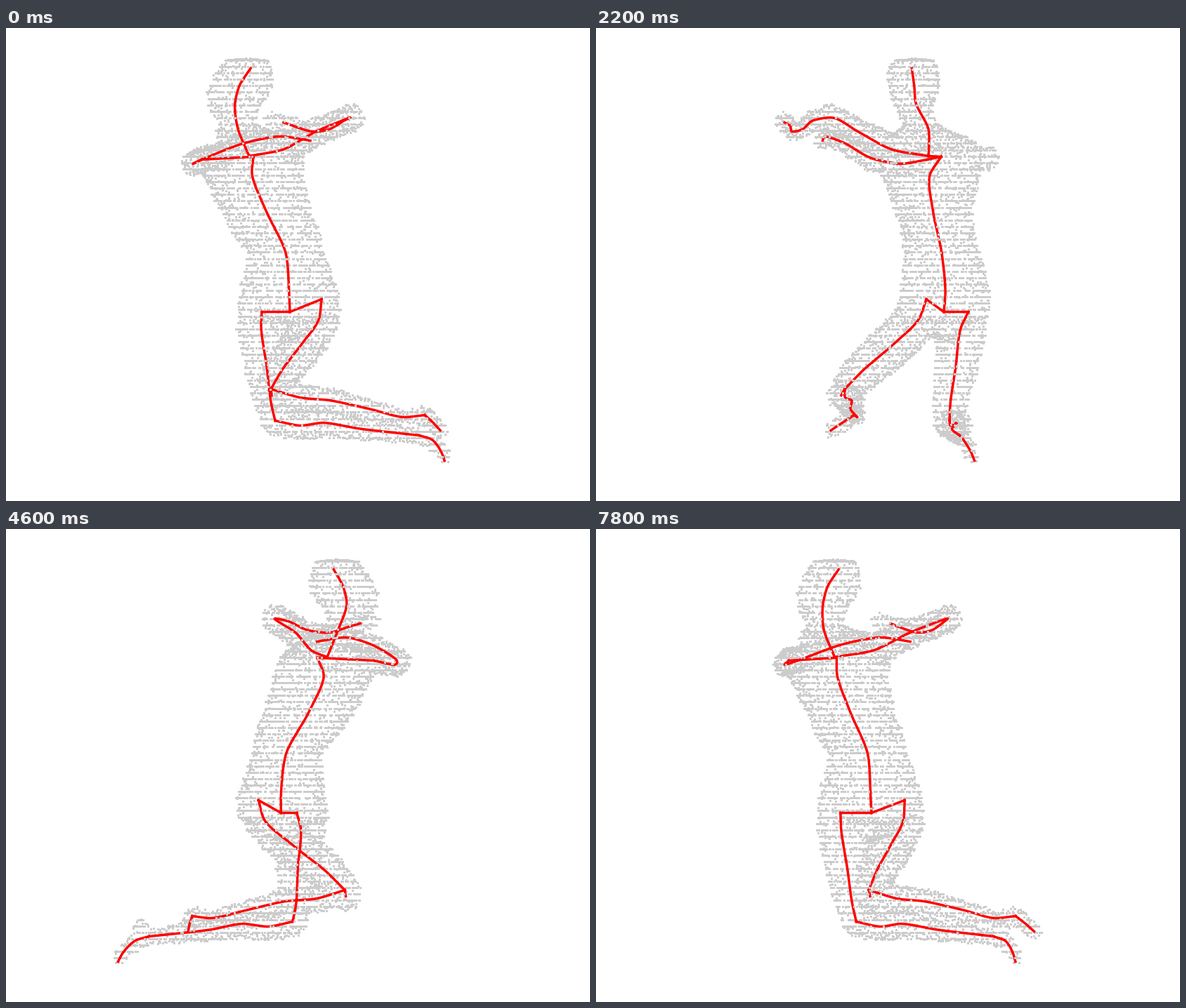
Write a matplotlib script that moves like this. It is 831x674 px and loops after 8000 ms.

```python
import numpy as np
import matplotlib.pyplot as plt
from matplotlib.animation import FuncAnimation

W, H, DPI = 831, 674, 64
FRAMES, INTERVAL = 40, 200
CX = 415.5                  # vertical turning axis
ROW, CELL = 9.12, 7.0       # sampling pitch, vertical and horizontal
PX = 72 / DPI
rng = np.random.default_rng(4)

# head and torso: x, z, y, long half-axis, short half-axis, turn in degrees
TRUNK = np.array([
    (-74, 24, 45, 28, 26, 27),
    (-77, 24, 60, 39, 36, 27),
    (-83, 23, 88, 47, 32, 27),
    (-92, 21, 112, 37, 24, 27),
    (-87, 31, 135, 22, 22, -20),
    (-63, 46, 160, 72, 36, -60),
    (-66, 48, 183, 77, 62, -52),
    (-66, 50, 207, 70, 69, -30),
    (-46, 57, 260, 64, 51, 30),
    (-18, 74, 320, 56, 46, -40),
    (-13, 80, 380, 73, 53, -28),
    (-14, 72, 415, 76, 58, -35),
], float)

# joints: x, z, y, flesh radius
NECK, CHEST, PELVIS = (-70, 47, 182, 20), (-64, 66, 183, 20), (-12, 78, 404, 40)
HIP_L, KNEE_L, ANKLE_L = (-52, 107, 404, 24), (-33, 83, 559, 20), (172, 130, 580, 10)
HIP_R, KNEE_R, ANKLE_R = (33, 60, 386, 22), (-39, -69, 514, 20), (180, -21, 551, 12)
ELBOW_L = (-138, 34, 187, 17)

HEAD = [(-68, 23, 57, 20), (-84, 24, 82, 20), (-90, 25, 105, 20),
        (-86, 44, 143, 18), NECK]
LIMBS = [
    [HIP_L, PELVIS], [PELVIS, HIP_R], [NECK, CHEST], [CHEST, ELBOW_L],
    # left leg
    [HIP_L, (-53, 97, 424, 34), (-45, 90, 482, 29), (-38, 83, 538, 22), KNEE_L],
    [KNEE_L, (2, 90, 566, 18), (35, 104, 562, 18), (84, 105, 570, 15), ANKLE_L],
    [ANKLE_L, (190, 138, 586, 10), (204, 152, 605, 9), (208, 157, 616, 5)],
    # right leg
    [HIP_R, (30, 50, 412, 28), (7, 12, 447, 31), (-24, -41, 488, 26), KNEE_R],
    [KNEE_R, (-38, -74, 523, 18)],
    [KNEE_R, (2, -62, 526, 18), (44, -46, 530, 17), (104, -38, 543, 13),
     (151, -21, 554, 9), ANKLE_R],
    [ANKLE_R, (192, -36, 562, 10), (202, -51, 573, 9)],
    # left forearm
    [ELBOW_L, (-150, -7, 193, 15), (-137, -40, 187, 17), (-75, -76, 163, 13),
     (-25, -95, 154, 10), (17, -92, 160, 10)],
    # right arm
    [NECK, (-20, 0, 172, 22), (25, -40, 147, 17), (74, -72, 127, 18),
     (64, -100, 132, 13), (46, -115, 143, 11), (19, -136, 147, 10),
     (-10, -144, 138, 11), (-21, -153, 134, 11)],
]
# flesh without a bone: shoulder, heel, fingers
PADS = [[(-112, 125, 184, 16), ELBOW_L], [(184, 137, 566, 9), ANKLE_L],
        [(-21, -153, 134, 11), (-38, -157, 130, 9)]]


def trunk(x, z, rows):
    """Distance-like field of a stack of turned ellipses."""
    mx, mz, a, b, turn = (np.interp(rows, TRUNK[:, 2], TRUNK[:, c])[:, None, None]
                          for c in (0, 1, 3, 4, 5))
    turn = np.radians(turn)
    dx, dz = x - mx, z - mz
    along = dx * np.cos(turn) + dz * np.sin(turn)
    across = dz * np.cos(turn) - dx * np.sin(turn)
    field = (np.hypot(along / a, across / b) - 1) * np.sqrt(a * b)
    field[(rows < TRUNK[0, 2]) | (rows > TRUNK[-1, 2])] = 60
    return field


def capsule(x, z, y, p, q):
    """Distance to a tapered capsule between two joints."""
    p, q = np.array(p, float), np.array(q, float)
    d = q - p
    t = (x - p[0]) * d[0] + (z - p[1]) * d[1] + (y - p[2]) * d[2]
    t = np.clip(t / (d[:3] @ d[:3]), 0, 1)
    gap = np.sqrt((x - p[0] - t * d[0])**2 + (z - p[1] - t * d[1])**2
                  + (y - p[2] - t * d[2])**2)
    return gap - p[3] - t * d[3]


def cloud():
    """Points where the lines of a grid cross the body surface."""
    rows = 36.2 + ROW * np.arange(66)
    axis = CELL * np.arange(-42, 43)
    u, v = np.meshgrid(axis, axis, indexing="ij")
    x, z = (v - u) / np.sqrt(2), (u + v) / np.sqrt(2)
    y = rows[:, None, None]
    field = trunk(x, z, rows)
    for joints in LIMBS + PADS:
        for p, q in zip(joints, joints[1:]):
            field = np.minimum(field, capsule(x, z, y, p, q))
    field += rng.uniform(-3, 3, field.shape)

    found = []
    for k in range(3):
        n = field.shape[k]
        a, b = field.take(range(n - 1), k), field.take(range(1, n), k)
        hit = a * b < 0
        pos = np.argwhere(hit).astype(float)
        pos[:, k] += a[hit] / (a[hit] - b[hit])
        found.append(pos)
    pos = np.vstack(found)
    u, v = (axis[0] + CELL * pos[:, 1:] + rng.uniform(-2, 2, (len(pos), 2))).T
    return np.column_stack([(v - u) / np.sqrt(2), (u + v) / np.sqrt(2),
                            rows[0] + ROW * pos[:, 0]])


def strand(joints):
    """Smooth curve through joints, ended by a gap."""
    p = np.array([j[:3] for j in joints], float)
    t = np.r_[0, np.cumsum(np.linalg.norm(np.diff(p, axis=0), axis=1))]
    m = 0.8 * np.gradient(p, t, axis=0)
    s = np.linspace(0, 1, 9)[:, None]
    ease = s * s * (3 - 2 * s)
    parts = [p[i] + ease * (p[i + 1] - p[i])
             + (t[i + 1] - t[i]) * s * (1 - s) * ((1 - s) * m[i] - s * m[i + 1])
             for i in range(len(p) - 1)]
    return np.vstack(parts + [np.full((1, 3), np.nan)])


spine = [CHEST, *TRUNK[TRUNK[:, 2] > 200][:-1], PELVIS]
bones = np.vstack([strand(s) for s in [HEAD, spine, *LIMBS]])
skin = cloud()
front = skin[rng.random(len(skin)) < 0.1]

fig = plt.figure(figsize=(W / DPI, H / DPI), dpi=DPI, facecolor="white")
ax = fig.add_axes([0, 0, 1, 1])
ax.set_xlim(-0.5, W - 0.5)
ax.set_ylim(H - 0.5, -0.5)
ax.axis("off")

dots = dict(ls="", marker="s", ms=3 * PX, mew=0, color="#cccccc")
layers = [
    (skin, ax.plot([], [], **dots)[0]),
    (bones, ax.plot([], [], color="#ff0000", lw=3.5 * PX)[0]),
    (front, ax.plot([], [], **dots)[0]),
]


def draw(i):
    turn = 2 * np.pi * i / FRAMES
    for pts, line in layers:
        x = CX + pts[:, 0] * np.cos(turn) + pts[:, 1] * np.sin(turn)
        line.set_data(x, pts[:, 2])
    return [line for _, line in layers]


anim = FuncAnimation(fig, draw, frames=FRAMES, interval=INTERVAL,
                     repeat=True, repeat_delay=0, blit=False)
plt.show()
```
